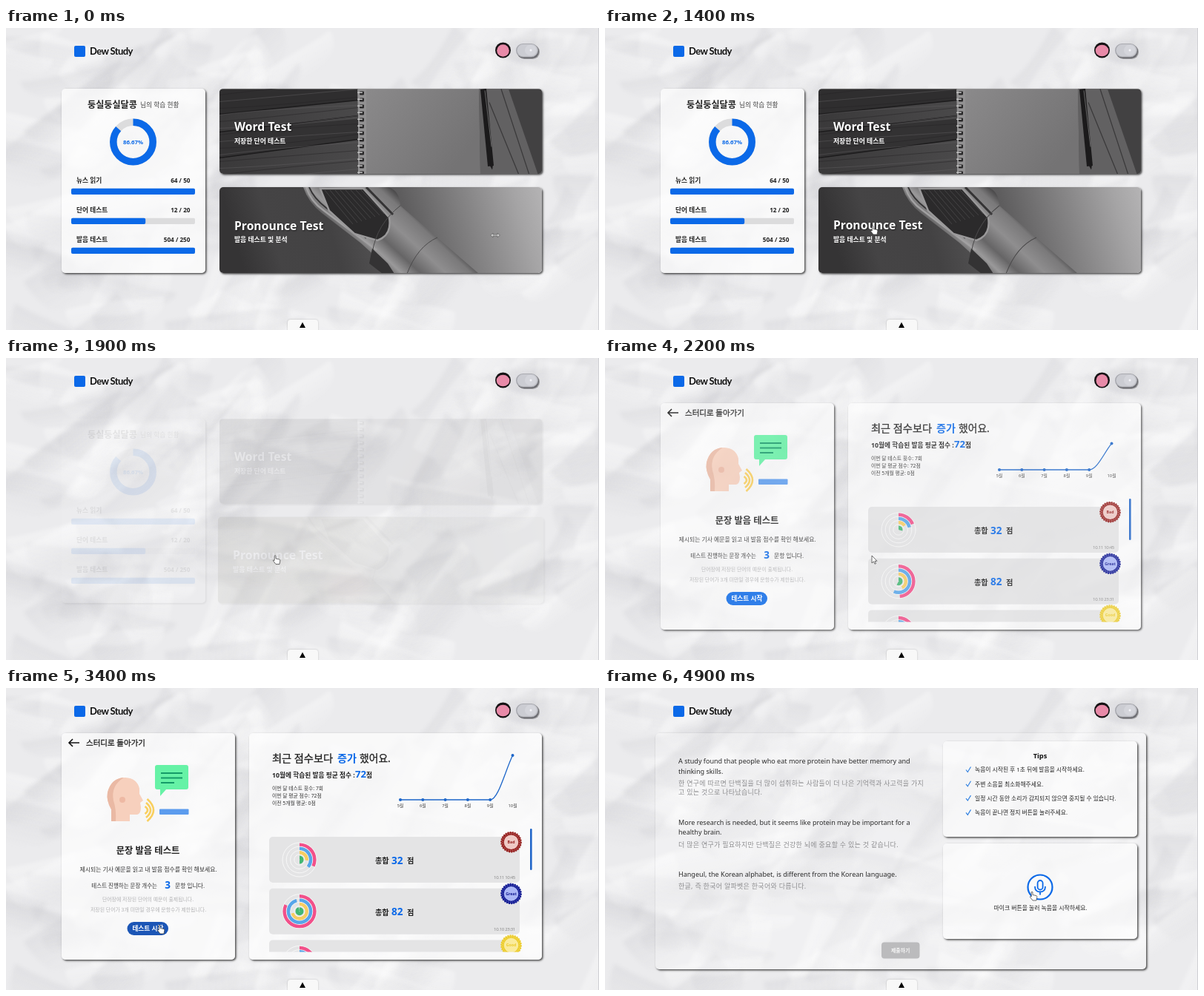
An HTML page with a canvas for the animation above (5000 ms loop, 800 px wide and 408 px high).

```html
<!DOCTYPE html>
<html lang="ko">
<head>
<meta charset="utf-8">
<style>
html, body { margin: 0; width: 100%; height: 100%; overflow: hidden; background: #ebebed; }
#stage { position: relative; width: 800px; height: 408px; overflow: hidden;
  font-family: 'Noto Sans', 'Noto Sans CJK KR', 'Noto Sans CJK', sans-serif; }
#stage > *, .page > * { position: absolute; left: 0; top: 0; }
.page { width: 800px; height: 408px; }
.card { border-radius: 5px; box-shadow: 1.5px 1.5px 2.5px rgba(0,0,0,.7); overflow: hidden; }
svg { display: block; }
text[font-weight="500"] { stroke: #222; stroke-width: .3px; }
</style>
</head>
<body>
<div id="stage"></div>
<script>
const BLUE = '#0b69e8', W = 800, H = 408;
const stage = document.getElementById('stage');

// ---- markup helpers ----
const text = (x, y, size, str, fill = '#222', weight = 400, anchor = 'start', more = '') =>
  `<text x="${x}" y="${y}" font-size="${size}" fill="${fill}" font-weight="${weight}" text-anchor="${anchor}" ${more}>${str}</text>`;
const rect = (x, y, w, h, r, fill, more = '') =>
  `<rect x="${x}" y="${y}" width="${w}" height="${h}" rx="${r}" fill="${fill}" ${more}/>`;
const circle = (x, y, r, fill, more = '') => `<circle cx="${x}" cy="${y}" r="${r}" fill="${fill}" ${more}/>`;
const path = (d, fill, stroke = 'none', width = 1, more = '') =>
  `<path d="${d}" fill="${fill}" stroke="${stroke}" stroke-width="${width}" ${more}/>`;
const svg = (body, x = 0, y = 0, w = W, h = H) =>
  `<svg width="${w}" height="${h}" viewBox="${x} ${y} ${w} ${h}">${body}</svg>`;
const card = (x, y, w, h, alpha, body = '', id = '') =>
  `<div class="card" id="${id}" style="left:${x}px;top:${y}px;width:${w}px;height:${h}px;background:rgba(255,255,255,${alpha})">${body && svg(body, x, y, w, h)}</div>`;
const arc = (x, y, r, deg, color, width, more = '') =>
  circle(x, y, r, 'none', `stroke="${color}" stroke-width="${width}" pathLength="360" stroke-dasharray="${deg} 360" transform="rotate(-90 ${x} ${y})" ${more}`);
const gradient = (id, dir, stops) => `<linearGradient id="${id}" ${dir}>` +
  stops.map(([o, c]) => `<stop offset="${o}" stop-color="${c}"/>`).join('') + '</linearGradient>';
const repeat = (n, f) => Array.from({ length: n }, (_, i) => f(i)).join('');

// ---- crumpled paper ----
function paper() {
  const cv = document.createElement('canvas');
  cv.width = W; cv.height = H;
  const g = cv.getContext('2d');
  let seed = 11;
  const rnd = () => (seed = seed * 16807 % 2147483647) / 2147483647;
  g.fillStyle = '#ebebed';
  g.fillRect(0, 0, W, H);
  g.filter = 'blur(2.5px)';
  for (let i = 0; i < 150; i++) {
    const len = 60 + rnd() * 150, wide = 20 + rnd() * 50;
    const tone = i % 2 ? '255,255,255' : '200,200,205';
    g.save();
    g.translate(rnd() * W, rnd() * H);
    g.rotate(-.4 + (rnd() - .5) * 1.6);
    const fade = g.createLinearGradient(0, 0, 0, wide);
    fade.addColorStop(0, `rgba(${tone},${i % 2 ? .36 : .26})`);
    fade.addColorStop(1, `rgba(${tone},0)`);
    g.fillStyle = fade;
    g.beginPath();
    g.moveTo(-len / 2, 0);
    g.bezierCurveTo(-len / 5, rnd() * 24 - 12, len / 5, rnd() * 24 - 12, len / 2, 0);
    g.quadraticCurveTo(len / 2, wide, 0, wide);
    g.quadraticCurveTo(-len / 2, wide, -len / 2, 0);
    g.fill();
    g.restore();
  }
  return cv;
}

// ---- header and bottom tab ----
const frame = svg(
  rect(92, 24, 15, 15, 2, BLUE) +
  text(113, 35.5, 13, 'Dew Study', '#111', 700, 'start', 'letter-spacing="-.6" font-family="Lato, sans-serif"') +
  circle(670.5, 30, 10.5, '#161214') + `<ellipse id="face" cx="670.5" cy="30.5" fill="#e88aa8"/>` +
  rect(690, 23, 30, 19, 9.5, 'rgba(0,0,0,.3)') + rect(689, 22, 30, 19, 9.5, '#66666b') +
  rect(688, 21, 30, 18.5, 9.2, '#a9aab0') + rect(689.5, 22, 27.5, 16.5, 8.2, '#cbccd2') +
  rect(700, 23, 15.5, 14, 7, '#d4d5db') + circle(708, 30, 1.5, '#f4f4f8') +
  rect(380, 394, 41, 20, 4, '#f8f8f8', 'style="filter:drop-shadow(0 0 1px #0003)"') + path('M396 405L400 397.5L404 405Z', '#000') +
  rect(799, 0, 1, 408, 0, '#cfcfd3'));

// ---- study overview ----
const title = (y, name, note) =>
  text(308, y, 15.7, name, '#fff', 600, 'start', 'style="text-shadow:1px 1px 2px #0008"') +
  text(308, y + 16.5, 8.8, note, '#fff', 700);

const progress = [['뉴스 읽기', '64 / 50', 1], ['단어 테스트', '12 / 20', .6], ['발음 테스트', '504 / 250', 1]];
const overview = svg(
  text(110, 108, 12.1, '둥실둥실달콩', '#222', 700) + text(181, 107, 8.7, '님의 학습 현황', '#444') +
  circle(171.5, 154, 26.7, 'none', 'stroke="#dcdcdd" stroke-width="9.5"') +
  arc(171.5, 154, 26.7, 312, BLUE, 9.5) + text(171.5, 157, 7.8, '86.67%', BLUE, 700, 'middle') +
  progress.map(([label, value, part], i) =>
    text(95, 209 + 40 * i, 8.7, label, '#222', 700) + text(248.5, 209 + 40 * i, 8.2, value, '#222', 600, 'end') +
    rect(88, 216.7 + 40 * i, 167, 8.3, 2, '#dcdcdd') + rect(88, 216.7 + 40 * i, 167 * part, 8.3, 2, BLUE)).join(''));

const notebook =
  gradient('wood', 'x2="1"', [[0, '#3a393a'], [.43, '#4a494a']]) +
  gradient('sheet', 'x2="1" y2=".5"', [[0, '#8c8b8c'], [.5, '#807f80'], [1, '#747374']]) +
  rect(288, 82, 436, 116, 0, 'url(#wood)') +
  path('M288 82H475V97L288 116Z', '#2f2e2f') + path('M288 140L475 122V150L288 175Z', '#333233') +
  [116, 140, 175].map((y, i) => path(`M288 ${y}L475 ${y - 19 - i * 3}`, 'none', '#1c1b1c', 1.5)).join('') +
  repeat(14, i => path(`M288 ${90 + i * 9}q60 ${i % 3 * 3 - 8} 187 ${-19 + i % 4 * 2}`, 'none', i % 2 ? '#605f60' : '#242324', 1, 'opacity=".5"')) +
  rect(638, 82, 86, 116, 0, '#424142') + path('M638 82H678L718 198H640Z', '#626162') +
  path('M668 82L706 198M652 100L692 198', 'none', '#3b3a3b', 1.3) +
  path('M474 82H638L640 198H477Z', 'url(#sheet)') + rect(475, 82, 11, 116, 0, '#929192') +
  repeat(13, i => rect(477, 85 + 9 * i, 6, 5, 1, '#2a292a') + rect(474, 86 + 9 * i, 7, 1.4, .7, '#c4c4c4')) +
  path('M644 82L654 186', 'none', '#1b1a1b', 8) + path('M646 84L655 160', 'none', '#666', 1) + path('M652 184l5 0l-1 7Z', '#1b1a1b') +
  title(138.5, 'Word Test', '저장한 단어 테스트');

const microphone =
  gradient('room', 'x2="1" y2="-.08"', [[0, '#353435'], [.12, '#454445'], [.3, '#434243'], [.55, '#5e5d5e'], [.75, '#868586'], [.9, '#a5a4a5'], [1, '#b6b5b6']]) +
  gradient('steel', 'gradientUnits="userSpaceOnUse" x1="478" y1="300" x2="546" y2="226"',
    [[0, '#5a595a'], [.15, '#9a999a'], [.32, '#666566'], [.55, '#8f8e8f'], [.78, '#7a797a'], [.9, '#484748'], [1, '#6a696a']]) +
  gradient('glow', 'x2="1"', [[0, 'rgba(112,110,66,.55)'], [.35, 'rgba(140,136,80,.55)'], [.6, 'rgba(185,190,172,.45)'], [1, 'rgba(205,210,198,.4)']]) +
  rect(288, 215, 436, 117, 0, 'url(#room)') +
  path('M401 215H516Q531 220 532 240L638 332H524L478 290L426 250Q408 236 401 215Z', 'url(#steel)') +
  path('M405 215Q411 234 428 246L500 300', 'none', '#a2a1a2', 2.5) + path('M409 215Q415 230 432 243L486 284', 'none', '#353435', 2) +
  path('M424 217H482L517 256Q521 280 501 287L470 278L436 247Z', '#2b2a2b', '#9a999a', 2.5) +
  repeat(8, i => path(`M${430 + i * 7} 219l${38 - i} ${46 - i * 2}`, 'none', '#4c4b4c', .8)) +
  path('M486 215L522 252', 'none', '#343334', 3) +
  path('M532 240Q500 265 494 304M582 283Q555 295 541 332', 'none', '#4a494a', 1) +
  path('M494 298L515 318L524 332H508L490 318Z', '#343334') +
  `<g id="tint" opacity="0">${rect(288, 215, 436, 117, 0, 'url(#glow)')}<ellipse cx="462" cy="308" rx="30" ry="18" fill="#e08a78" opacity=".45" style="filter:blur(8px)"/></g>` +
  title(272.5, 'Pronounce Test', '발음 테스트 및 분석');

const page1 = card(75, 82, 194, 249, .7) + overview + card(288, 81.5, 435, 115.5, 1, notebook) + card(288, 215, 435, 116, 1, microphone, 'mic');

// ---- pronunciation scores ----
const intro =
  path('M99 74H85M90 69L85 74L90 79', 'none', '#111', 1.6) + text(108, 78, 10.5, '스터디로 돌아가기', '#222', 500) +
  path('M142 180V164Q135 152 137 141Q142 121 161 121Q177 122 180 136L180 143L185 152L181 155L182 161Q182 170 177 171L167 171V180Z', '#f7d0bd') +
  path('M142 180V164Q135 152 137 141Q142 122 159 121Q141 132 145 152Q149 164 148 180Z', '#eab9a4') +
  circle(157, 151, 4, '#eeb9a4') +
  [5, 10, 15].map(r => path(`M${186 + r * .3} ${165 - r}Q${188 + r * 1.3} 165 ${186 + r * .3} ${165 + r}`, 'none', '#f9cf5e', 2.6)).join('') +
  path('M204 104H243Q246 104 246 107V134Q246 137 243 137H216L208 146V137H204Q201 137 201 134V107Q201 104 204 104Z', '#66f2a6') +
  path('M209 115H238M209 121.5H238M209 128H227', 'none', '#159a68', 2) +
  rect(207, 163.5, 39.5, 7.5, 1, '#5c9cee') +
  text(191.5, 224, 12.3, '문장 발음 테스트', '#222', 700, 'middle') +
  text(192, 248, 7.88, '제시되는 기사 예문을 읽고 내 발음 점수를 확인 해보세요.', '#333', 400, 'middle') +
  text(204, 270, 7.5, '테스트 진행하는 문장 개수는', '#333', 400, 'end') + text(218, 271, 13.5, '3', BLUE, 800, 'middle') +
  text(228, 270, 7.8, '문항 입니다.', '#333') +
  text(191.5, 288, 6.9, '단어장에 저장된 단어의 예문이 출제됩니다.', '#b4b4b6', 400, 'middle') +
  text(192, 301.5, 6.9, '저장된 단어가 3개 미만일 경우에 문항수가 제한됩니다.', '#b4b4b6', 400, 'middle') +
  rect(163.5, 316, 55.5, 18, 9, BLUE, 'id="start"') + text(191.5, 328.2, 8.7, '테스트 시작', '#fff', 700, 'middle');

const months = [5, 6, 7, 8, 9, 10], monthX = i => 532 + 30.3 * i;
const summary =
  text(359, 100, 14.2, '최근 점수보다', '#222', 500) + text(447, 100, 14.2, '증가', BLUE, 700) + text(477, 100, 13.8, '했어요.', '#222', 500) +
  text(359, 120.5, 8.7, '10월에 학습된 발음 평균 점수 :', '#222', 700) + text(471, 121, 13.2, '72', BLUE, 700) + text(486, 120.5, 8.7, '점', '#222', 700) +
  ['이번 달 테스트 횟수: 7회', '이번 달 평균 점수: 72점', '이전 5개월 평균: 0점'].map((s, i) => text(359, 138 + 10 * i, 6.8, s, '#333')).join('') +
  path('', 'none', '#1d66c9', 1.3, 'id="line"') +
  months.map((m, i) => circle(monthX(i), 151, 2, '#1d66c9', i == 5 ? 'id="peak"' : '') + text(monthX(i), 161, 5.8, m + '월', '#444', 400, 'middle')).join('');

const RING = ['#f2508a', '#57a6ea', '#f7cd62', '#43b873'];
const results = [
  { score: 32, time: '10.11 10:45', sweep: [115, 130, 95, 180], mark: 'Bad', color: '#96201f', tint: '#efc9c5' },
  { score: 82, time: '10.10 23:31', sweep: [295, 345, 255, 350], mark: 'Great', color: '#121a92', tint: '#aab6f6' },
  { score: 61, time: '10.10 23:12', sweep: [220, 240, 200, 240], mark: 'Good', color: '#eccc2c', tint: '#faeb9c' }];
const result = (r, i) => {
  const y = 201 + 69.7 * i, c = y + 31;
  return rect(355, y, 338, 62, 5, '#e4e4e5') +
    [23, 17.8, 12.5, 7.2].map(q => circle(396, c, q, 'none', 'stroke="#fafafa" stroke-width=".9"')).join('') +
    r.sweep.map((deg, k) => arc(396, c, [20.4, 15.1, 9.8, 3][k], 0, RING[k], [4.4, 4.4, 4.4, 5][k], `class="ring" data-deg="${deg}"`)).join('') +
    text(498, c + 5, 10.2, '총합', '#222', 700) + text(520, c + 5.5, 13.6, r.score, BLUE, 700) + text(541, c + 5, 10.2, '점', '#222', 700) +
    text(687, y + 57, 6, r.time, '#888', 400, 'end', 'letter-spacing="-.3"') +
    circle(681.5, y + 7.2, 11.5, r.tint, `stroke="${r.color}" stroke-width="3.4"`) +
    circle(681.5, y + 7.2, 13.4, 'none', `stroke="${r.color}" stroke-width="1.8" stroke-dasharray="2 1.2"`) +
    circle(681.5, y + 7.2, 11.5, 'none', `stroke="${r.tint}" stroke-width=".6" stroke-dasharray="1.5 1.5"`) +
    text(681.5, y + 9, 5.2, r.mark, r.color, 700, 'middle');
};
const page2 = card(75, 61, 233.5, 305.5, .7) + card(328, 61, 395, 305.5, .7) +
  svg(intro + summary + '<clipPath id="list"><rect x="350" y="190" width="350" height="166.5"/></clipPath>' +
    `<g clip-path="url(#list)">${results.map(result).join('')}</g>` + rect(707, 190, 2.6, 56, 1.3, '#2166c9'));

// ---- recording ----
const english = (y, s) => text(99, y, 9.05, s, '#2b2b2b');
const korean = (y, s) => text(99, y, 9, s, '#8e8e90', 400, 'start', 'letter-spacing=".28"');
const tips = ['녹음이 시작된 후 1초 뒤에 발음을 시작하세요.', '주변 소음을 최소화해주세요.',
  '일정 시간 동안 소리가 감지되지 않으면 중지될 수 있습니다.', '녹음이 끝나면 정지 버튼을 눌러주세요.'];
const page3 = card(68, 61, 662, 319, .25) + card(456, 72, 262, 128.5, .58) + card(456, 210, 262, 128.5, .58) + svg(
  english(102, 'A study found that people who eat more protein have better memory and') + english(115.5, 'thinking skills.') +
  korean(131.5, '한 연구에 따르면 단백질을 더 많이 섭취하는 사람들이 더 나은 기억력과 사고력을 가지') + korean(144, '고 있는 것으로 나타났습니다.') +
  english(184.5, 'More research is needed, but it seems like protein may be important for a') + english(198, 'healthy brain.') +
  korean(214.5, '더 많은 연구가 필요하지만 단백질은 건강한 뇌에 중요할 수 있는 것 같습니다.') +
  english(254.5, 'Hangeul, the Korean alphabet, is different from the Korean language.') +
  korean(270.5, '한글, 즉 한국어 알파벳은 한국어와 다릅니다.') +
  rect(373, 343.5, 51.5, 22, 4, '#bbbbbd') + text(398.7, 357, 6.9, '제출하기', '#f6f6f6', 700, 'middle') +
  text(587, 95, 9.3, 'Tips', '#111', 700, 'middle') +
  tips.map((s, i) => path(`M487 ${110.5 + 19.3 * i}l2.3 3l4.2 -7`, 'none', '#2b7de0', 1.1) + text(499, 113.3 + 19.3 * i, 7.8, s, '#222')).join('') +
  circle(587, 269, 16.5, '#fafafa', `stroke="${BLUE}" stroke-width="2.2"`) +
  rect(583.6, 260, 7, 12.5, 3.5, 'none', `stroke="${BLUE}" stroke-width="1.8"`) +
  path('M580 268Q580 275.5 587 275.5Q594 275.5 594 268M587 275.5V279.5', 'none', BLUE, 1.8) +
  text(587.5, 299.5, 7.86, '마이크 버튼을 눌러 녹음을 시작하세요.', '#222', 400, 'middle'));

// ---- pointer shapes, tip at 0,0 ----
const pointer = svg('<g id="pointer">' +
  path('M-6.5 0L-3 -3V-1H3V-3L6.5 0L3 3V1H-3V3Z', '#c8c8c8', '#666', .8) +
  path('M0 0V10L2.4 7.9L4 11.3L5.5 10.6L4 7.3H7Z', '#fff', '#333', .7) +
  path('M-.8 .8Q0 -.6 1 .8V4.5L6 5.6Q7 6 6.8 7.5L6 12H1L-2.6 7.4Q-2.8 5.8 -.8 7Z', '#fff', '#333', .7) + '</g>');

stage.append(paper());
stage.insertAdjacentHTML('beforeend', [page1, page2, page3].map(p => `<div class="page">${p}</div>`).join('') + frame + pointer);

// ---- motion ----
const $ = id => document.getElementById(id);
const pages = [...document.querySelectorAll('.page')], rings = document.querySelectorAll('.ring');
const shapes = [...$('pointer').children];
const ramp = (t, a, b) => Math.min(1, Math.max(0, (t - a) / (b - a)));
const smooth = p => p * p * (3 - 2 * p);
const RESIZE = 0, ARROW = 1, HAND = 2;
// time, x, y, shape
const track = [[0, 660, 280, RESIZE], [100, 660, 280, RESIZE], [300, 220, 268, ARROW], [600, 150, 268, ARROW],
  [900, 174, 295, ARROW], [1200, 215, 288, ARROW], [1380, 361, 267, HAND], [1700, 364, 267, HAND], [1900, 363, 266.5, HAND],
  [2000, 360, 267, ARROW], [2550, 360, 267, ARROW], [3000, 207, 320, HAND], [3500, 207, 320, ARROW], [3700, 207, 320, ARROW],
  [4250, 512, 302, ARROW], [4700, 576, 275, HAND], [5000, 576, 275, HAND]];

function movePointer(t) {
  const i = track.findIndex((k, n) => t < track[n + 1][0]);
  const [t0, x0, y0, shape] = track[i], [t1, x1, y1] = track[i + 1];
  const p = smooth(ramp(t, t0, t1));
  $('pointer').setAttribute('transform', `translate(${x0 + (x1 - x0) * p} ${y0 + (y1 - y0) * p})`);
  shapes.forEach((s, n) => s.style.display = n == shape ? '' : 'none');
}

function draw(t) {
  const show = [1 - ramp(t, 1620, 1925), ramp(t, 1950, 2250) * (1 - ramp(t, 3420, 3510)), ramp(t, 3510, 3600)];
  pages.forEach((p, i) => { p.style.opacity = show[i]; p.style.display = show[i] ? '' : 'none'; });

  const hover = smooth(ramp(t, 1400, 1700));
  $('mic').style.transform = `scale(${1 + .01 * hover})`;
  $('tint').setAttribute('opacity', hover);

  const grow = 1 - (1 - ramp(t, 2000, 3000)) ** 4, top = 151 - 60 * grow;
  $('line').setAttribute('d', `M532 151H653.2C664 151 673 ${151 - 38 * grow} 683.5 ${top}`);
  $('peak').setAttribute('cy', top);
  rings.forEach(r => r.setAttribute('stroke-dasharray', `${r.dataset.deg * grow} 360`));
  $('start').setAttribute('fill', t > 2950 ? '#1c56b6' : BLUE);

  const bob = .5 * Math.sin(t / 5000 * Math.PI * 20);
  $('face').setAttribute('rx', 8.3 - bob);
  $('face').setAttribute('ry', 8.3 + bob);
  movePointer(t);
}

const began = performance.now();
(function tick() {
  draw((performance.now() - began) % 5000);
  requestAnimationFrame(tick);
})();
</script>
</body>
</html>
```
